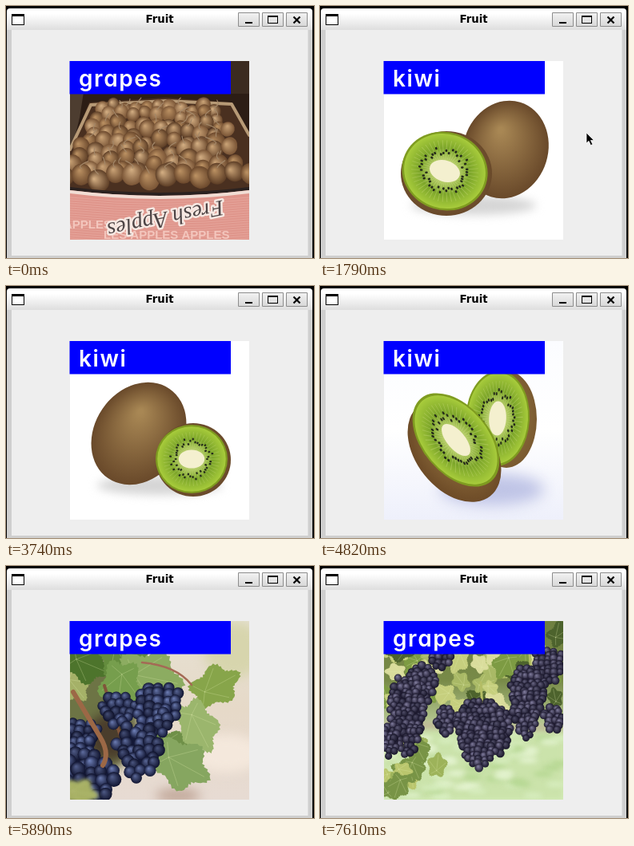
An HTML page with a canvas that plays this animation: 385x316 px, repeating every 8000 ms.

```html
<!DOCTYPE html>
<html lang="en">
<head>
<meta charset="utf-8">
<title>Fruit</title>
<style>
  html, body { margin: 0; width: 385px; height: 316px; overflow: hidden; background: #000; }
  svg, canvas { position: absolute; left: 0; top: 0; display: block; }
  canvas { left: 80px; top: 69px; }
  .title { font: bold 13.3px "DejaVu Sans", sans-serif; text-anchor: middle; }
  .label { font: 600 28px Inter, sans-serif; font-feature-settings: "cv11"; letter-spacing: 1.6px; fill: #fff; }
</style>
</head>
<body>
<svg width="385" height="316">
  <defs>
    <linearGradient id="bar" x2="0" y2="1"><stop offset=".25" stop-color="#fff"/><stop offset="1" stop-color="#dedede"/></linearGradient>
    <linearGradient id="btn" x2="0" y2="1"><stop stop-color="#f2f2f2"/><stop offset="1" stop-color="#d8d8d8"/></linearGradient>
  </defs>
  <path d="M1 30H383V316H1Z" fill="#cfcfcf"/>
  <path d="M1 30V7Q1 3 5 3H379Q383 3 383 7V30Z" fill="url(#bar)"/>
  <path d="M7 30H377.500V313H7Z" fill="#eee"/>
  <path d="M7 10H23V24H7Z"/><path d="M8 13H22V23H8Z" fill="#fff"/>
  <text class="title" x="192" y="21">Fruit</text>
  <g fill="url(#btn)" stroke="#8c8c8c">
    <path d="M290.500 8.500h26v17h-26zM320.500 8.500h26v17h-26zM350.500 8.500h26v17h-26z"/>
  </g>
  <path d="M299 20h9v2h-9z"/>
  <path d="M327 12h13v10h-13zM328 14v7h11v-7z" fill-rule="evenodd"/>
  <path d="M359.500 13.500l8 8m0-8l-8 8" stroke="#000" stroke-width="2.200"/>
</svg>
<canvas width="224" height="224"></canvas>
<svg width="385" height="316">
  <path d="M79.500 69H281V110.500H79.500Z" fill="#00f"/>
  <text class="label" id="label" x="91" y="100.500"></text>
  <path id="cursor" d="M0 0V13L3 10.300 5.400 15.600 7.800 14.600 5.400 9.500H9.400Z" stroke="#fff" stroke-width=".7"/>
</svg>
<script>
const ctx = document.querySelector('canvas').getContext('2d');
const label = document.getElementById('label');
const cursor = document.getElementById('cursor');
ctx.translate(-80, -69); // paint in stage coordinates
ctx.lineCap = ctx.lineJoin = 'round';

let seed;
function rand(a = 0, b = 1) {
  seed = (seed * 16807) % 2147483647;
  return a + (b - a) * seed / 2147483647;
}
const pick = list => list[Math.floor(rand(0, list.length))];

function backdrop(...colors) {
  const g = ctx.createLinearGradient(0, 69, 0, 293);
  colors.forEach((c, i) => g.addColorStop(i / Math.max(1, colors.length - 1), c));
  ctx.fillStyle = g;
  ctx.fillRect(80, 69, 224, 224);
}
function oval(x, y, rx, ry, fill, turn = 0) {
  ctx.beginPath();
  ctx.ellipse(x, y, rx, ry, turn, 0, 7);
  ctx.fillStyle = fill;
  ctx.fill();
}
function ball(x, y, rx, ry, light, dark, turn = 0) {
  ctx.save();
  ctx.translate(x, y);
  ctx.rotate(turn);
  ctx.scale(rx, ry);
  const g = ctx.createRadialGradient(-.25, -.35, .05, 0, 0, 1);
  g.addColorStop(0, light);
  g.addColorStop(1, dark);
  oval(0, 0, 1, 1, g);
  ctx.restore();
}
function shape(d, fill) { ctx.fillStyle = fill; ctx.fill(new Path2D(d)); }
function line(d, color, width = 1) {
  ctx.strokeStyle = color;
  ctx.lineWidth = width;
  ctx.stroke(new Path2D(d));
}
function blur(px, paint) {
  ctx.filter = `blur(${px}px)`;
  paint();
  ctx.filter = 'none';
}
function leaf(x, y, r, turn, color, squash = .8) {
  ctx.save();
  ctx.translate(x, y);
  ctx.rotate(turn);
  ctx.scale(1, squash);
  ctx.beginPath();
  for (let a = 0; a < 6.28; a += .08) {
    const d = r * (.85 + .14 * Math.cos(5 * a) + .04 * Math.cos(35 * a));
    ctx.lineTo(d * Math.cos(a), d * Math.sin(a));
  }
  ctx.fillStyle = color;
  ctx.fill();
  for (let i = 0; i < 5; i++) {
    const a = i * Math.PI * .4;
    line(`M${-r * .4} 0L${r * .8 * Math.cos(a)} ${r * .8 * Math.sin(a)}`, '#e4eeb055', .8);
  }
  ctx.restore();
}
// Loose rows of berries: rounded shoulders, tapering to a tip
function bunch(x, top, width, height, r, light, dark) {
  oval(x, top + height * .42, width * .42, height * .42, dark);
  for (let y = 0; y <= height; y += r * 1.1) {
    const t = y / height;
    const half = width / 2 * Math.min(1, .55 + 1.8 * t) * Math.sqrt(Math.max(.03, 1 - t ** 1.8));
    for (let dx = -half + rand(0, r); dx <= half; dx += r * 1.5) {
      const bx = x + dx + rand(-.35, .35) * r, by = top + y + rand(-.35, .35) * r, size = r * rand(.85, 1.1);
      ball(bx, by, size, size, light, dark);
      oval(bx, by, size, size, `rgba(8,8,24,${rand(0, .45)})`);
    }
  }
}
function kiwiFace(x, y, a, b, turn) {
  ctx.save();
  ctx.translate(x, y);
  ctx.rotate(turn);
  oval(0, 0, a, b, '#7f9c20');
  ctx.scale(a, b);
  const g = ctx.createRadialGradient(0, 0, .2, 0, 0, .96);
  g.addColorStop(0, '#c4d77a');
  g.addColorStop(.5, '#7ca52a');
  g.addColorStop(1, '#a9cd3c');
  oval(0, 0, .95, .95, g);
  for (let i = 0; i < 46; i++) {
    const t = i * Math.PI / 23, c = Math.cos(t), s = Math.sin(t), d = rand(.42, .6);
    line(`M${c * .3} ${s * .3}L${c * .78} ${s * .78}`, '#d5e38a55', .018);
    oval(c * d, s * d, .035, .026, '#24291a', t);
  }
  oval(0, 0, .36, .27, '#f4f0cf');
  ctx.restore();
}
const kiwi = (x, y, rx, ry, turn = 0) => ball(x, y, rx, ry, '#a88754', '#69492a', turn);

function fruitBox() {
  backdrop('#2c1d15', '#2c1d15');
  shape('M80 108H97L92 140 80 190Z', '#4d3d30');
  shape('M281 69H304V110H281Z', '#3b2b20');
  shape('M104 121L200 115 281 121 304 162V240H80V180Z', '#4a3020');
  line('M80 180L106 124 200 119 282 123 304 162', '#b79a76', 4);
  for (let row = 0; row < 9; row++) {
    const y = 127 + row * 10.8, half = 72 + row * 6;
    for (let x = 192 - half + rand(0, 9); x < 192 + half; x += 14 + row * .9) {
      const r = (8.5 + row * .45) * rand(.85, 1.15), cy = y + rand(-6, 6), turn = rand(-.7, .7);
      ball(x, cy, r, r * 1.08, pick(['#c7a074', '#b98f61', '#d0ab80']), pick(['#6b482c', '#7a5536', '#5d3e26']), turn);
      if (rand() < .35) line(`M${x} ${cy - r * .6}q${rand(-8, 8)} -3 ${rand(-12, 12)} -9`, '#a3886a', 1.1);
    }
  }
  shape('M80 228Q192 242 304 228V293H80Z', '#df958b');
  line('M80 229Q192 243 304 229', '#2b2220', 4);
  line('M80 233Q192 247 304 233', '#f1ddd4', 4);
  for (let y = 240; y < 293; y += 3) line(`M80 ${y}Q192 ${y + 11} 304 ${y}`, '#f4c4b955', 1);
  ctx.font = 'bold 15px "Liberation Sans", sans-serif';
  ctx.fillStyle = '#f3c6bd';
  ctx.fillText('APPLES', 72, 279);
  ctx.fillText('LES APPLES APPLES', 122, 292);
  ctx.save();
  ctx.translate(199, 265);
  ctx.rotate(Math.PI - .2);
  ctx.font = 'italic 28px "Liberation Serif", serif';
  ctx.textAlign = 'center';
  ctx.strokeStyle = '#f6e8e2';
  ctx.lineWidth = 5;
  ctx.strokeText('Fresh Apples', 0, 7);
  ctx.fillStyle = '#4d4445';
  ctx.fillText('Fresh Apples', 0, 7);
  ctx.restore();
}
function fruitGrid() {
  backdrop('#fafafa', '#f1f4f8');
  const xs = [101, 135, 172, 209, 245, 279];
  const skins = ['#849d3e', '#5a4034', '#7b303a', '#759738', '#718c39', '#7b8f38'];
  const cut = (x, y, rx, ry, skin, flesh) => {
    line(`M${x} ${y - ry}q1 -4 1 -8`, '#6d5a3c', 1.5);
    ball(x, y, rx, ry, skin, skin);
    oval(x, y, rx * .76, ry * .83, flesh);
    for (let i = 0; i < 10; i++)
      oval(x + (i % 2 ? 1 : -1) * rx * .4, y - ry * .5 + i * ry * .11, 1, 1.5, '#3d4121');
    oval(x, y, rx * .22, ry * .55, '#e3df98');
  };
  ball(279, 96, 9, 14, '#bfa260', '#8d743d');
  xs.forEach((x, i) => {
    if (i < 5) oval(x, 108, 6, 4, i % 2 ? '#766043' : '#7b8d3a');
    cut(x, 142, i === 2 ? 9 : 11, 16 + (i === 0) * 2, i === 2 ? '#5b6428' : '#71852e', i === 2 ? '#7d8a32' : '#b5c253');
    const rx = [10, 13, 10, 12, 11, 12][i], ry = [17, 24, 21, 27, 19, 18][i], y = 200 - (i === 3) * 6;
    line(`M${x} ${y - ry}q2 -4 2 -9`, '#6d5a3c', 1.5);
    ball(x, y, rx, ry, skins[i], ['#637c2c', '#3c2923', '#54202a', '#56752a', '#536c28', '#5d722a'][i]);
    if (i === 1) ball(x, 258, 11, 20, '#57332c', '#2a1716');
    else cut(x, i === 3 ? 252 : 255, i === 3 ? 13 : 9, i === 3 ? 25 : 19 - (i > 3) * 4,
      i === 2 ? '#672820' : '#6e852e', i === 2 ? '#a64b2c' : '#a7b94c');
  });
  shape('M80 283H304V290H80Z', '#d3e2df');
  for (let x = 81; x < 304; x += 3) line(`M${x} 283v${(x - 81) % 15 ? 3 : 6}`, '#68817e', .8);
}
function kiwiPair() {
  backdrop('#fbfcff', '#fff', '#eef0fb');
  blur(9, () => oval(215, 255, 65, 20, '#bfc4e6'));
  ball(233, 167, 38, 61, '#a2824a', '#7a5a30');
  kiwiFace(222, 166, 60, 40, 1.62);
  ball(168, 207, 72, 48, '#a5844b', '#6d4b27', .9);
  kiwiFace(170, 193, 68, 42, .87);
}
function kiwiWhite(variant) {
  backdrop('#fff', '#fff');
  blur(6, () => oval(192, 250, 78, 12, '#d5d5d5'));
  if (variant === 0) {
    kiwi(232, 180, 53, 62, .3);
    kiwi(158, 210, 57, 53);
    kiwiFace(156, 207, 54, 49, .3);
  } else if (variant === 1) {
    kiwi(166, 185, 55, 68, .6);
    kiwi(234, 218, 47, 46);
    kiwiFace(232, 217, 45, 43, 0);
  } else {
    kiwi(192, 195, 78, 70);
    kiwiFace(190, 193, 74, 66, 0);
  }
}
function vineyard() {
  backdrop('#e6e1d2', '#e6d9c8', '#e7dbd3');
  blur(7, () => {
    oval(285, 105, 38, 35, '#d7d5ad');
    oval(275, 235, 45, 24, '#f4e8dc');
    oval(110, 190, 55, 75, '#6d7445');
    oval(130, 215, 30, 30, '#4a3d2c');
    oval(215, 288, 28, 10, '#c3aa9c');
  });
  leaf(85, 150, 24, .9, '#a5b168');
  leaf(100, 122, 33, .4, '#4d742c');
  leaf(145, 115, 40, 1, '#648c3e');
  leaf(178, 140, 46, .2, '#8cac61');
  leaf(143, 150, 36, 1.7, '#769e4d');
  leaf(261, 151, 36, -.5, '#87a54a', .75);
  leaf(239, 200, 38, 1.1, '#9bb66d', .72);
  leaf(205, 225, 26, .2, '#6f9048');
  leaf(218, 248, 42, .5, '#86a660');
  line('M170 121Q213 125 232 149', '#a46a55', 2.5);
  line('M123 150Q136 192 145 219', '#81553a', 4);
  const blue = (...box) => bunch(...box, '#6f80b8', '#141938');
  blue(95, 198, 42, 45, 7);
  blue(141, 166, 48, 34, 7);
  blue(190, 152, 62, 62, 7.5);
  blue(168, 203, 58, 62, 8);
  blue(103, 238, 66, 78, 9);
  line('M84 158Q106 195 118 215T121 250', '#9c6846', 6);
  blur(2, () => leaf(92, 284, 24, .2, '#a7b064'));
}
function splash() {
  backdrop('#fff', '#fff');
  blur(5, () => {
    oval(165, 133, 50, 32, '#c3d4d6');
    oval(211, 128, 40, 22, '#d9e7e9');
  });
  const berry = (x, y, rx, ry, turn = 0) => ball(x, y, rx, ry, '#873571', '#2c0938', turn);
  berry(130, 173, 16, 23, .2);
  berry(160, 178, 20, 28);
  berry(194, 181, 20, 27);
  berry(255, 168, 17, 24, -.4);
  ball(281, 212, 16, 28, '#aa7991', '#622746', -.15);
  berry(274, 258, 18, 21);
  berry(188, 264, 17, 22, -.2);
  berry(133, 218, 20, 29, -.2);
  berry(170, 230, 22, 30);
  berry(223, 178, 21, 30, .1);
  oval(232, 213, 8, 7, '#668528');
  berry(258, 217, 22, 28);
  berry(207, 233, 25, 32, .1);
  berry(247, 274, 24, 29, .15);
  for (let i = 0; i < 330; i++) {
    const x = 168 + rand(-62, 62) + rand(-25, 25), y = 110 + 90 * rand() * rand(.2, 1), r = rand(.6, 2.7);
    oval(x, y, r, r, pick(['#dceaebcc', '#87a2aacc', '#fff', '#526f7b99']));
    oval(x - r * .2, y - r * .2, r * .5, r * .5, '#ffffffcc');
  }
}
function hangingGrapes() {
  backdrop('#6f8040', '#788a48', '#cfe2b0', '#d6edbd');
  blur(3, () => {
    shape('M80 196L304 203V293H80Z', '#cbe3ab');
    for (let i = 0; i < 70; i++) oval(rand(80, 304), rand(208, 293), 12, 3, pick(['#e8f6d6', '#b3d68f', '#d9efc2']));
    shape('M80 193L304 200V207L80 204Z', '#bdb795');
  });
  for (let i = 0; i < 44; i++)
    leaf(rand(80, 304), rand(75, 178), rand(12, 23), rand(0, 6), pick(['#7d9b43', '#a9b966', '#c6cf7e', '#4d632d', '#d9dc9c']));
  for (let i = 0; i < 16; i++)
    leaf(rand(80, 150), rand(205, 290), rand(12, 21), rand(0, 6), pick(['#9db35a', '#bac66d', '#789446']));
  line('M201 146L203 178M262 110L264 138', '#b4bd65', 3);
  const dark = (...box) => bunch(...box, 5, '#817d9e', '#211d33');
  dark(151, 98, 34, 32);
  dark(128, 126, 40, 50);
  dark(110, 142, 48, 96);
  dark(88, 200, 24, 40);
  dark(158, 178, 28, 36);
  dark(225, 180, 32, 58);
  dark(200, 171, 66, 84);
  dark(286, 106, 42, 44);
  dark(259, 128, 46, 90);
  dark(292, 178, 28, 32);
}
function vineBunch(light, dark, ...sky) {
  backdrop(...sky);
  for (let i = 0; i < 12; i++)
    leaf(rand(85, 300), rand(85, 155), rand(20, 34), rand(0, 6), pick(['#789749', '#9bb166', '#5d7c39']));
  line('M195 110L193 155', '#89704c', 4);
  bunch(192, 146, 108, 124, 10, light, dark);
}

const scenes = [
  [0, fruitBox], [1790, () => kiwiWhite(0)], [2750, fruitGrid],
  [3740, () => kiwiWhite(1)], [4330, () => kiwiWhite(2)], [4820, kiwiPair],
  [5390, () => vineBunch('#77698f', '#271c3b', '#d6dfc0', '#e8e5d6')],
  [5890, vineyard],
  [6300, () => vineBunch('#87708d', '#39203d', '#b5c58c', '#d9e2bd')],
  [6700, splash],
  [7110, () => vineBunch('#68729a', '#1e2341', '#a6b878', '#cadba5')],
  [7610, hangingGrapes]
];
const pointer = [
  [0], [330, 125, 300], [410, 239, 169], [490, 185, 185],
  [660, 205, 181], [740, 250, 175], [815, 292, 169], [890, 322, 164], [970, 338, 162], [1050, 344, 161],
  [1200, 338, 160], [1290, 333, 159], [2360, 337, 159], [2430]
];
const current = (steps, t) => steps.findLast(step => step[0] <= t);

let shown;
function draw(now) {
  const t = now % 8000;
  const scene = current(scenes, t);
  if (scene !== shown) {
    shown = scene;
    seed = 4711 + scene[0];
    scene[1]();
    label.textContent = scene[0] >= 1790 && scene[0] < 5390 ? 'kiwi' : 'grapes';
  }
  const [, x, y] = current(pointer, t);
  cursor.setAttribute('visibility', x ? 'visible' : 'hidden');
  if (x) cursor.setAttribute('transform', `translate(${x} ${y})`);
  requestAnimationFrame(draw);
}
draw(performance.now());
</script>
</body>
</html>
```
